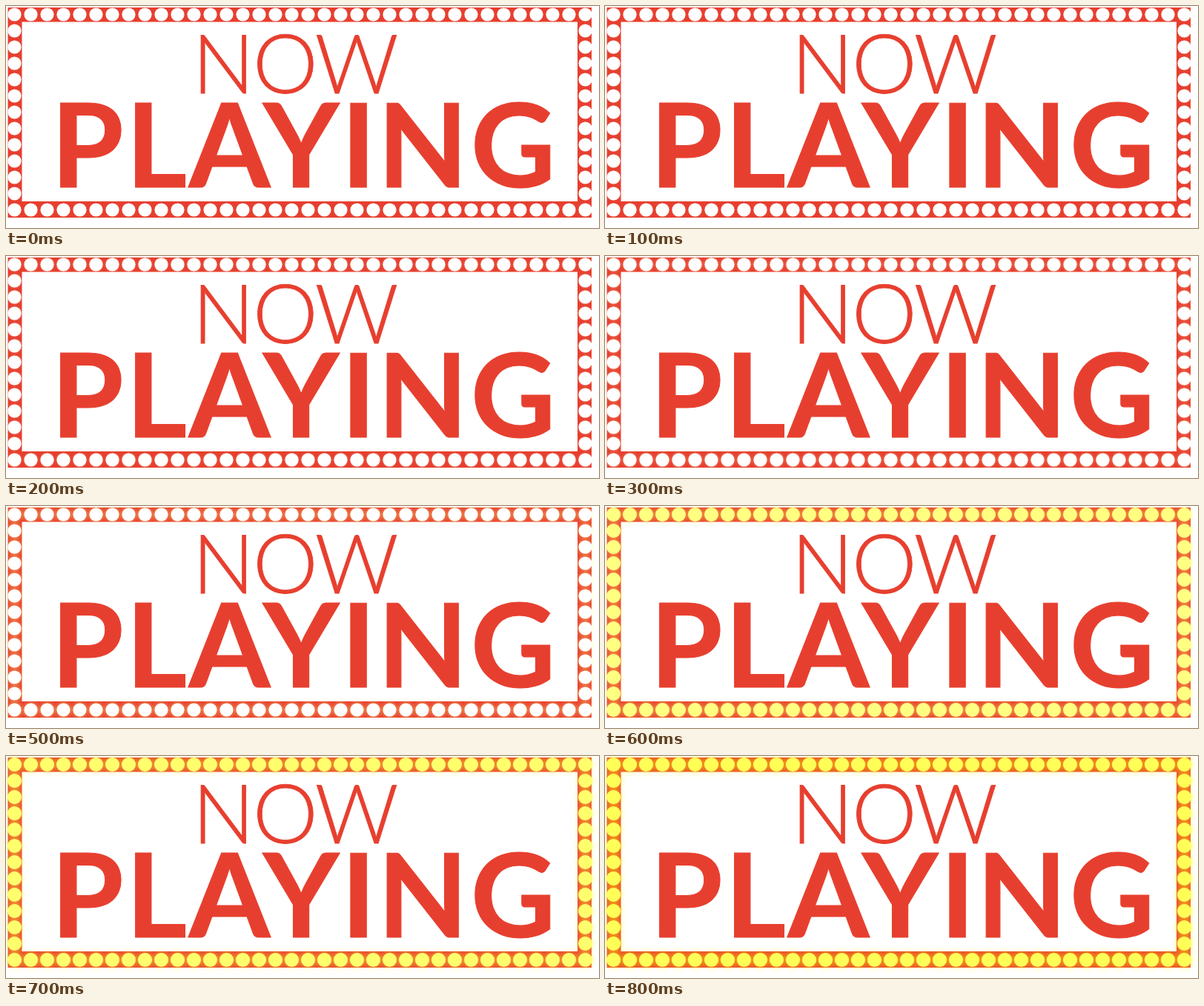
Animation of 800 by 300 pixels, one loop 1700 ms. Source, as an HTML page with a canvas:

```html
<!DOCTYPE html>
<html lang="en">
<head>
<meta charset="utf-8">
<title>Now playing</title>
<style>
  html, body { margin: 0; width: 100%; height: 100%; overflow: hidden; background: #fff; }
  canvas { display: block; }
</style>
</head>
<body>
<canvas id="stage" width="800" height="300"></canvas>
<script>
const ctx = document.getElementById('stage').getContext('2d');
const RED = '#e73f2f';
const LOOP = 1700, STEP = 100, LAST_STEP = 8, YELLOW_STEP = 6;
const ORIGIN = 11.5, PITCH = 22, COLS = 36, ROWS = 13;

// All bulbs around the frame, corners included
function bulbPath(radius) {
  const path = new Path2D();
  for (let row = 0; row < ROWS; row++) {
    const fullRow = row === 0 || row === ROWS - 1;
    for (let col = 0; col < COLS; col += fullRow ? 1 : COLS - 1) {
      const x = ORIGIN + col * PITCH, y = ORIGIN + row * PITCH;
      path.moveTo(x + radius, y);
      path.arc(x, y, radius, 0, Math.PI * 2);
    }
  }
  return path;
}

// Sets a word at a given cap height, each letter centred on its own spot
function drawWord(word, weight, capHeight, baseline, centers) {
  const outline = capHeight * 0.01;
  const setFont = size => { ctx.font = `${weight} ${size}px Lato, sans-serif`; };
  setFont(200);
  setFont(200 * (capHeight - outline) / ctx.measureText('I').actualBoundingBoxAscent);
  ctx.fillStyle = ctx.strokeStyle = RED;
  ctx.lineWidth = outline;
  ctx.miterLimit = 3;
  [...word].forEach((letter, i) => {
    const m = ctx.measureText(letter);
    const x = centers[i] + (m.actualBoundingBoxLeft - m.actualBoundingBoxRight) / 2;
    const y = baseline - outline / 2;
    ctx.fillText(letter, x, y);
    ctx.strokeText(letter, x, y);
  });
}

function drawMarquee(step) {
  const glow = step / LAST_STEP;
  const warmth = step < YELLOW_STEP ? 0 : 1 - (LAST_STEP - step) / 8;
  ctx.fillStyle = RED;
  ctx.beginPath();
  ctx.rect(2.5, 2, 787.5, 284);
  ctx.rect(21.5, 21.5, 749.5, 242.5);
  ctx.fill('evenodd');

  // The halo swells and yellows gradually; the bulbs themselves switch late
  ctx.save();
  ctx.fillStyle = `rgb(255,255,${255 - 167 * warmth})`;
  ctx.shadowColor = `rgba(255,255,${255 * (1 - glow ** 1.5)},${0.75 * Math.sqrt(glow)})`;
  ctx.shadowBlur = 10 * glow;
  ctx.fill(bulbPath(9.1 + 0.5 * warmth));
  ctx.restore();
}

function draw(time) {
  const step = Math.min(LAST_STEP, Math.floor(time % LOOP / STEP));
  ctx.fillStyle = '#fff';
  ctx.fillRect(0, 0, 800, 300);
  drawMarquee(step);
  drawWord('NOW', 300, 79.5, 118, [293.5, 377, 473.2]);
  drawWord('PLAYING', 700, 115.5, 245.5, [114.5, 208, 301.7, 398, 475.3, 562, 683]);
}

const start = performance.now();
function tick() {
  draw(performance.now() - start);
  requestAnimationFrame(tick);
}
tick();
</script>
</body>
</html>
```
